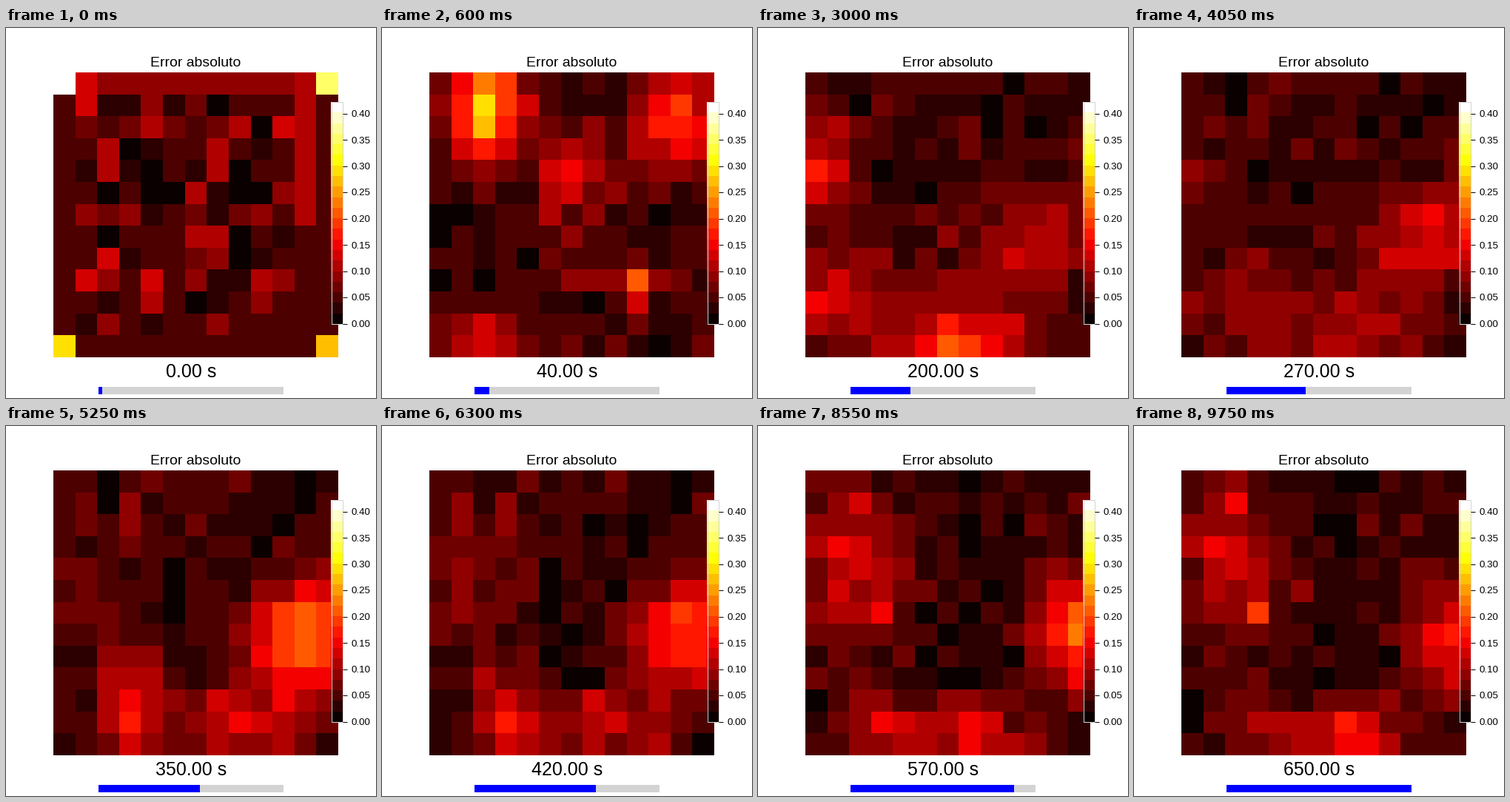
Animation of 500 by 500 pixels, one loop 9.9 s. Source, as a matplotlib script:

```python
import matplotlib.pyplot as plt
import numpy as np
from matplotlib.animation import FuncAnimation
from matplotlib.patches import Rectangle

SIZE, CELLS, LEVELS = 500, 13, 21
FRAMES, INTERVAL, STEP = 66, 150, 10
BAR_X, BAR_W = 125, 250
AMBIENT = 1.3

plt.rcParams["font.family"] = "Liberation Sans"
rng = np.random.default_rng(4)
rows, cols = np.mgrid[0:CELLS, 0:CELLS]
grain_a, grain_b = rng.normal(0, 0.8, (2, CELLS, CELLS))

# Hot spots: peak time, duration, column, row, height, radius x, radius y
EARLY = [
    (40, 35, 2.1, 1.2, 12, 1.7, 2.2),
    (45, 35, 11, 1.7, 8, 1.9, 2),
    (40, 30, 6, 4, 6, 1.5, 1.8),
    (40, 25, 9, 9.2, 8, 0.8, 0.9),
    (40, 35, 2, 11.6, 6, 2, 1),
    (120, 45, 6.3, 8, 9, 2, 2.8),
    (120, 45, 9.5, 9, 6, 2.4, 1.8),
    (115, 45, 11, 2.5, 5, 2, 3),
    (120, 40, 1, 6, 3, 2, 3.5),
]
LATE = [
    (200, 55, 0.4, 3.7, 6, 1.1, 2.2),
    (205, 60, 6.5, 12, 7.5, 3, 1.8),
    (200, 70, 1, 9.8, 5, 2.2, 2),
    (215, 65, 10, 7.5, 4, 2.2, 2.2),
    (360, 90, 11, 7.4, 9.5, 2.5, 2.8),
    (350, 85, 3, 10, 6, 1.4, 2.2),
    (350, 90, 8, 11, 3.5, 2, 1.8),
    (520, 90, 12, 6.6, 8, 1.7, 2.4),
    (650, 130, 11.8, 7, 5.5, 1.8, 2.5),
    (600, 200, 1.6, 3.5, 5, 2.2, 3.5),
    (640, 150, 3, 6, 6, 0.6, 0.6),
    (520, 160, 3, 11.2, 4.5, 1.5, 1.5),
    (650, 260, 7, 11.6, 6, 2.5, 1.6),
]


def start_field():
    """Flat error with scattered cells, raised edges and hot corners."""
    field = np.full((CELLS, CELLS), 2.0)
    field[1:12, 1:11] = rng.choice(
        7, (11, 10), p=[0.13, 0.17, 0.36, 0.1, 0.12, 0.07, 0.05])
    field[0] = 4
    field[:7, 11] = 5
    field[:2, 1] = 6
    field[[0, 0, -1, -1], [0, -1, 0, -1]] = 20, 17, 14, 13
    return field


start = start_field()


def field_at(seconds):
    turn = seconds / 130
    field = AMBIENT + grain_a * np.cos(turn) + grain_b * np.sin(turn)
    for peak, span, x, y, height, rx, ry in EARLY + LATE:
        shape = ((cols - x) / rx) ** 2 + ((rows - y) / ry) ** 2
        field += height * np.exp(-shape - ((seconds - peak) / span) ** 2)
    fade = np.exp(-seconds / 10)
    return np.clip(np.rint(fade * start + (1 - fade) * field), 0, LEVELS - 1)


fig = plt.figure(figsize=(SIZE / 100, SIZE / 100), dpi=100, facecolor="white")
ax = fig.add_axes([0, 0, 1, 1])
ax.axis("off")


def pixels(px):
    return px * 72 / fig.dpi


def show(data, extent, z):
    return ax.imshow(data, extent=extent, cmap=plt.get_cmap("hot", LEVELS),
                     vmin=-0.5, vmax=LEVELS - 0.5, interpolation="nearest",
                     aspect="auto", zorder=z)


def block(x, y, w, h, color):
    return ax.add_patch(Rectangle((x, y), w, h, fc=color, lw=0, aa=False))


heat = show(start, (64, 449, 445, 60), 1)

# Colour scale
show(np.arange(LEVELS)[::-1, None], (439, 455, 400, 100), 3)
ax.add_patch(Rectangle((439.5, 99.5), 15, 300, fill=False, ec="lightgray",
                       lw=pixels(1), zorder=4))
for i in range(9):
    y = 399.5 - 35.5 * i
    ax.plot([455, 461], [y, y], color="black", lw=pixels(1),
            solid_capstyle="butt", zorder=4)
    ax.text(466.5, y + 4.5, f"{i * 0.05:.2f}", fontsize=pixels(13.4),
            va="baseline", zorder=4)

ax.text(256, 52, "Error absoluto", fontsize=pixels(19.4), ha="center",
        va="baseline")
clock = ax.text(250, 472, "", fontsize=pixels(25), ha="center",
                va="baseline")

block(BAR_X, 485, BAR_W, 10, "lightgray")
progress = block(BAR_X, 485, 0, 10, "blue")

ax.set_xlim(0, SIZE)
ax.set_ylim(SIZE, 0)


def update(i):
    seconds = i * STEP
    heat.set_data(field_at(seconds))
    clock.set_text(f"{seconds:.2f} s")
    progress.set_width(min(round(BAR_W * (i + 1) / FRAMES) + 1, BAR_W))
    return heat, clock, progress


anim = FuncAnimation(fig, update, frames=FRAMES, interval=INTERVAL,
                     repeat=True, repeat_delay=0)
plt.show()
```
